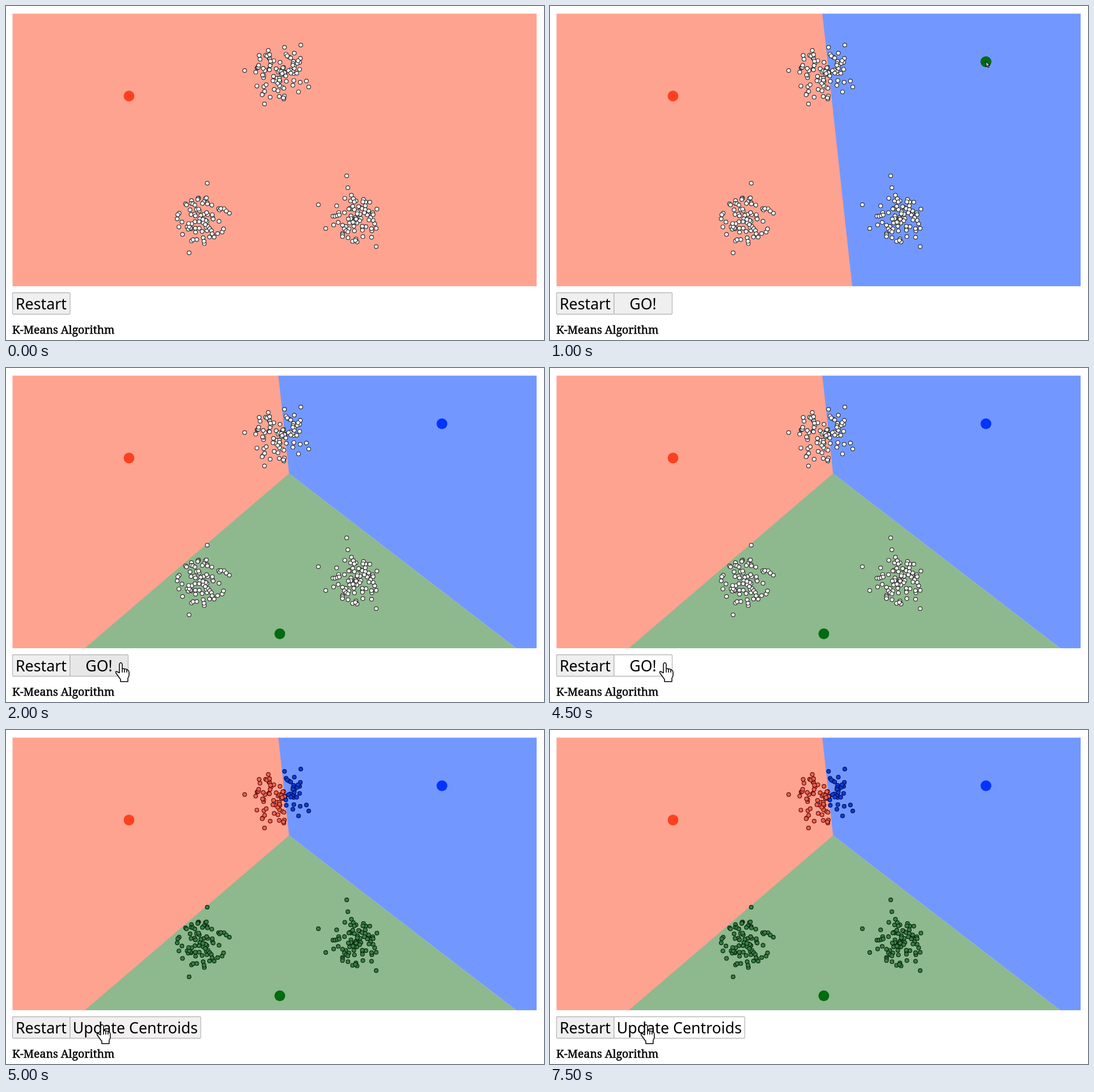
Recreate the animation shown at these times as an HTML page with a canvas. Size 949 by 590 pixels, loop 8 s.

```html
<!DOCTYPE html>
<html lang="en">
<head>
<meta charset="utf-8">
<title>K-Means Algorithm</title>
<style>
html, body { margin: 0; width: 100%; height: 100%; overflow: hidden; background: #fff; }
canvas { display: block; }
</style>
</head>
<body>
<canvas id="stage" width="949" height="590"></canvas>
<script>
const g = document.getElementById('stage').getContext('2d');
const LOOP = 8000;

const centroids = [
  { x: 217, y: 159, color: '#ff401f', area: '#ffa391', dot: '#ec6352', edge: '#650d08' },
  { x: 769, y: 98.5, color: '#0433ff', area: '#7298ff', dot: '#0b3fe0', edge: '#020e58' },
  { x: 483, y: 469.5, color: '#006b10', area: '#8eb88d', dot: '#397f47', edge: '#08260d' }
];

// Round clouds, denser in the middle, each with a few strays
const clusters = [
  { x: 484, y: 119, r: 50, count: 92, strays: [[421, 114], [456, 173], [520, 69], [534, 143]] },
  { x: 348, y: 379, r: 47, count: 82, strays: [[355, 313], [323, 436], [302, 376], [394, 366]] },
  { x: 618, y: 376, r: 44, count: 88, strays: [[601, 300], [603, 321], [551, 351], [564, 393], [653, 425]] }
];

let seed = 71;
const random = () => (seed = seed * 16807 % 2147483647) / 2147483647;

const dots = clusters.flatMap(c => [
  ...c.strays.map(([x, y]) => ({ x, y })),
  ...Array.from({ length: c.count }, () => {
    const angle = 2 * Math.PI * random();
    const r = c.r * random() ** .7;
    return { x: c.x + r * Math.cos(angle), y: c.y + r * Math.sin(angle) };
  })
]);
for (const d of dots) {
  const dist = c => Math.hypot(c.x - d.x, c.y - d.y);
  d.owner = centroids.reduce((a, b) => dist(b) < dist(a) ? b : a);
}

function paint(fill, stroke, width) {
  g.fillStyle = fill;
  g.fill();
  if (!stroke) return;
  g.strokeStyle = stroke;
  g.lineWidth = width;
  g.stroke();
}

function circle(x, y, r, fill, stroke) {
  g.beginPath();
  g.arc(x, y, r, 0, 2 * Math.PI);
  paint(fill, stroke, 1.2);
}

function button(label, x, width, fill = '#efefef') {
  g.beginPath();
  g.roundRect(x, 506.5, width, 38, 1.5);
  paint(fill, '#b8b8b8', 1.3);
  g.fillStyle = '#000';
  g.font = '26.8px "Noto Sans", "Open Sans", sans-serif';
  g.textAlign = 'center';
  g.fillText(label, x + width / 2 - .3, 536);
}

function pointer(path, x, y, fill, width) {
  g.save();
  g.translate(x, y);
  g.lineJoin = 'round';
  const shape = new Path2D(path);
  g.fillStyle = fill;
  g.fill(shape);
  g.lineWidth = width;
  g.strokeStyle = '#000';
  g.stroke(shape);
  g.restore();
}

const ARROW = 'M0 0V9L2 7L4 11L5.5 10L4 6.5H7Z';
const HAND = 'M7 19V3Q9.5-2 12 3V11Q23 11 24 17V24L22 28V34H9V30L1 19Q-1 13 7 19M12 11V18M16 12V18M20 13V18';

// Each area is the part of the plane nearer to its centroid than to the others
function plane(shown) {
  for (const c of shown) {
    g.save();
    for (const o of shown) {
      if (o === c) continue;
      g.translate((c.x + o.x) / 2, (c.y + o.y) / 2);
      g.rotate(Math.atan2(c.y - o.y, c.x - o.x));
      g.beginPath();
      g.rect(c === centroids[0] ? -1 : 0, -2000, 2000, 4000);
      g.resetTransform();
      g.clip();
    }
    g.fillStyle = c.area;
    g.fillRect(11.5, 13.5, 924.5, 481.5);
    g.restore();
  }
}

function draw(t) {
  const count = t < 1000 ? 1 : t < 2000 ? 2 : 3;
  const shown = centroids.slice(0, count);
  const assigned = t >= 5000;
  g.fillStyle = '#fff';
  g.fillRect(0, 0, 949, 590);

  plane(shown);
  for (const d of dots) {
    circle(d.x, d.y, 3.4, assigned ? d.owner.dot : '#fff', assigned ? d.owner.edge : '#303030');
  }
  for (const c of shown) circle(c.x, c.y, 9.5, c.color);
  if (count === 2) {
    // The next centroid hangs on the pointer
    circle(769, 98.5, 9.5, centroids[2].color);
    pointer(ARROW, 769, 98, '#bbb', 1);
  }

  button('Restart', 11.5, 101.5);
  if (assigned) button('Update Centroids', 113, 230.5, t < 7500 ? '#f2f0f1' : '#fff');
  else if (count > 1) button('GO!', 113, 102.5, t < 2000 ? '#efefef' : t < 4500 ? '#e7e7e7' : '#fff');
  if (count === 3) pointer(HAND, assigned ? 160 : 193, 520, '#fff', 1.5);

  g.fillStyle = g.strokeStyle = '#000';
  g.font = '19.5px "Noto Serif", serif';
  g.textAlign = 'left';
  g.lineWidth = .5;
  g.fillText('K-Means Algorithm', 11, 579);
  g.strokeText('K-Means Algorithm', 11, 579);
}

const start = performance.now();
function tick() {
  draw((performance.now() - start) % LOOP);
  requestAnimationFrame(tick);
}
tick();
</script>
</body>
</html>
```
